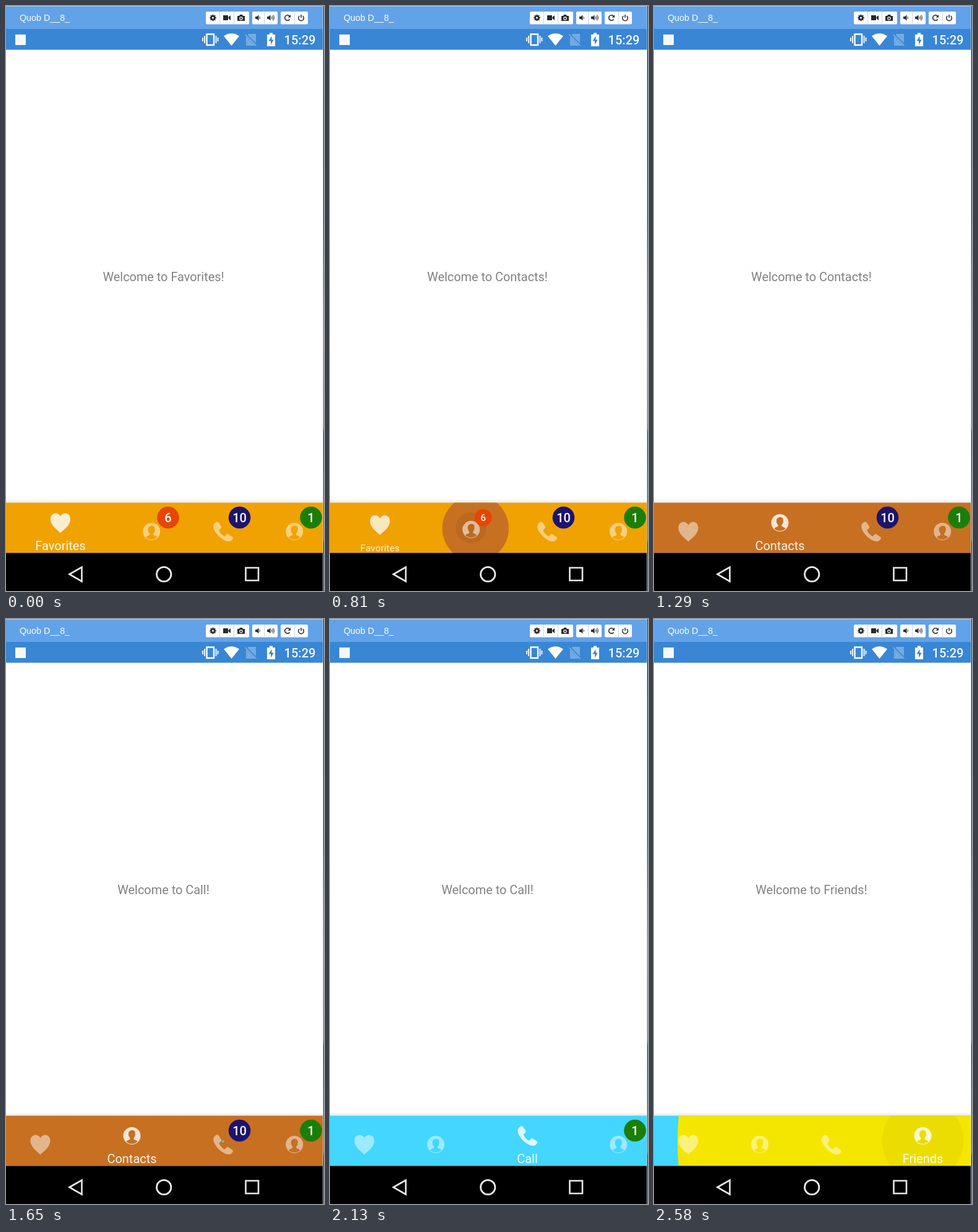
Animation, 514 px wide and 944 px high, one loop 2.61 s. Source, as an HTML page with a canvas:

```html
<!DOCTYPE html>
<html lang="en">
<head>
<meta charset="utf-8">
<title>Bottom navigation</title>
<style>
  html, body { margin: 0; width: 100%; height: 100%; overflow: hidden; background: #fff; }
  canvas { display: block; }
</style>
</head>
<body>
<canvas id="stage" width="514" height="944"></canvas>
<script>
const ctx = document.getElementById('stage').getContext('2d');
const TAU = Math.PI * 2;
const LOOP = 2610, STEP = 30;
const WIDTH = 512, BAR_TOP = 801.6, BAR_BOTTOM = 882.5;
const REVEAL_MS = 300, ITEM_MS = 150, ITEM_DELAY = 16;
const SPACING = 115.5;
const STATUS_BLUE = '#3986d4';

const heart = new Path2D(
  'M0 16.5C-3 12.5-16 5-16-6C-16-12-12-15.5-8-15.5C-4.500-15.500-1.500-13.500 0-10.500' +
  'C1.500-13.500 4.500-15.500 8-15.500C12-15.500 16-12 16-6C16 5 3 12.500 0 16.500Z');
const phone = new Path2D(
  'M-15.500-8.500C-15.500-11.500-13-14-11.500-15C-9.500-16.500-8-15.500-7-14.500L-3-8.500' +
  'C-2-6.500-3-5-4.500-4C-6-3-6.500-2-6-1C-4 3-1 6 2 7.500C3.500 8 4 7 5 5.500' +
  'C6 4 7.500 3.500 9 4.500L15 8.500C16.500 9.500 16.500 11 15.500 12.500' +
  'C14 14.500 12 16 9.500 16C0 16-15.500 2-15.500-8.500Z');
// A solid disc with the head and shoulders cut out of it.
const person = new Path2D();
person.arc(0, 0, 14, 0, TAU);
person.closePath();
person.addPath(new Path2D(
  'M-5.500-4C-5.500-8 0-10.500 3-8.500C5.500-8 5.500-5 5.300-3.500C6 0 4 2 3 3.500L3 5.500' +
  'C5 7 8 7 9 9.500Q5 13 0 13Q-5 13-9 9.500C-8 7-5 7-3 5.500L-3 3.500C-4 2-6 0-5.500-4Z'));

const tabs = [
  { label: 'Favorites', color: '#f0a202', icon: heart },
  { label: 'Contacts', color: '#c77022', icon: person, badge: '6', badgeColor: '#e64600' },
  { label: 'Call', color: '#43d6ff', icon: phone, badge: '10', badgeColor: '#1d146e' },
  { label: 'Friends', color: '#f5e602', icon: person, badge: '1', badgeColor: '#1b7e08' }
];
const selectedAt = [-1000, 747, 1639, 2359.5];

const clamp = v => Math.max(0, Math.min(1, v));
const mix = (a, b, p) => a + (b - a) * p;
const ease = p => 0.5 - 0.5 * Math.cos(Math.PI * clamp(p));

function rect(x, y, w, h, color) {
  ctx.fillStyle = color;
  ctx.fillRect(x, y, w, h);
}

function disc(x, y, r, color) {
  ctx.beginPath();
  ctx.arc(x, y, r, 0, TAU);
  ctx.fillStyle = color;
  ctx.fill();
}

function shape(d, color, x = 0, y = 0, stroke = 0) {
  const path = typeof d === 'string' ? new Path2D(d) : d;
  ctx.save();
  ctx.translate(x, y);
  if (stroke) {
    ctx.strokeStyle = color;
    ctx.lineWidth = stroke;
    ctx.stroke(path);
  } else {
    ctx.fillStyle = color;
    ctx.fill(path, 'evenodd');
  }
  ctx.restore();
}

function text(str, x, y, font, color, align = 'center') {
  ctx.font = font;
  ctx.textAlign = align;
  ctx.fillStyle = color;
  ctx.fillText(str, x, y);
}

function buttonGroup(x, width, dividers) {
  ctx.beginPath();
  ctx.roundRect(x, 9, width, 20.5, 2);
  ctx.fillStyle = '#fff';
  ctx.fill();
  dividers.forEach(d => rect(d, 9, 1, 20.5, '#c9d6e4'));
}

function speaker(x, waves) {
  const ink = '#303030';
  shape('M-5-2h2.500l3-2.500v9l-3-2.500h-2.500z', ink, x, 19);
  for (let i = 0; i < waves; i++) {
    ctx.beginPath();
    ctx.arc(x, 19, 2.5 + i * 2, -0.8, 0.8);
    ctx.strokeStyle = ink;
    ctx.lineWidth = 1;
    ctx.stroke();
  }
}

function drawTitleBar() {
  const ink = '#282828';
  rect(0, 0, WIDTH, 37, '#62a2e8');
  rect(0, 0, WIDTH, 1, '#a9cbf0');
  text('Quob D__8_', 22, 24, '14.3px "Liberation Sans", Arial, sans-serif', '#fff', 'left');
  buttonGroup(323, 70, [345, 368]);
  buttonGroup(398, 41, [417]);
  buttonGroup(444, 44, [466]);

  for (let i = 0; i < 8; i++) {
    ctx.save();
    ctx.translate(334.5, 19);
    ctx.rotate(i * TAU / 8);
    rect(-1.1, -5.2, 2.2, 3, ink);
    ctx.restore();
  }
  disc(334.5, 19, 3.8, ink);
  disc(334.5, 19, 1.6, '#fff');

  shape('M-6-4h8v8h-8zM2.500-1l3.500-3v8l-3.500-3z', ink, 357, 19);
  shape('M-6-3h3l1-2h4l1 2h3v8h-12z', ink, 380, 19);
  disc(380, 20, 2.8, '#fff');
  disc(380, 20, 1.6, ink);
  speaker(408, 1);
  speaker(427, 3);
  shape('M3.500 2.500A4.300 4.300 0 1 1 3-3', ink, 455, 19, 1.6);
  shape('M5-5v4.500h-4.500z', ink, 455, 19);
  shape('M-2.500-3.500A4.300 4.300 0 1 0 2.500-3.500M0-5.500V-.5', ink, 477, 19.5, 1.5);
}

function drawStatusBar() {
  rect(0, 37, WIDTH, 33.6, STATUS_BLUE);
  rect(15, 46, 17, 17, '#f4f8fc');
  shape('M324.500 45.500h11.500v17.500h-11.500z', '#fff', 0, 0, 2.4);
  shape('M321 48v12M339.500 48v12M318 51v6M342.500 51v6', '#fff', 0, 0, 1.8);
  shape('M364.500 64L352 48.500Q364.500 40 377 48.500Z', '#fff');
  shape('M392 45h12v15L390.500 46.500zM388 49l15 15h-15z', 'rgba(255,255,255,.3)');
  shape('M386.500 46l18 18', 'rgba(255,255,255,.35)', 0, 0, 1.6);
  shape('M422 46h4v-2.500h5v2.500h4v19h-13z', '#fff');
  shape('M429.500 48.500l-5 8h3.500v6l4.800-8h-3.300z', STATUS_BLUE);
  text('15:29', 475, 62, '500 20px Roboto, sans-serif', '#f5f9ff');
}

function drawSystemBar() {
  const ink = '#e8e8e8';
  rect(0, BAR_BOTTOM, WIDTH, 944 - BAR_BOTTOM, '#000');
  shape('M102.500 917L122.500 905.500V928.500Z', ink, 0, 0, 2.6);
  shape('M243.500 917a11.700 11.700 0 1 0 23.400 0a11.700 11.700 0 1 0-23.400 0', ink, 0, 0, 2.8);
  shape('M387.500 906.500h20.500v20.500h-20.500z', ink, 0, 0, 2.6);
}

function drawEdge() {
  const edge = ctx.createLinearGradient(0, 0, 0, 944);
  [[0, '#16324f'], [0.36, '#1d4a70'], [0.56, '#35b4e0'], [0.72, '#2f9fd0'],
   [0.73, '#1c4668'], [0.91, '#2b88b5'], [0.92, '#142a3f'], [1, '#142a3f']]
    .forEach(([at, color]) => edge.addColorStop(at, color));
  rect(WIDTH, 0, 1, 944, '#a5c3d8');
  rect(WIDTH + 1, 0, 1, 944, edge);
}

// Tabs beyond the wide one sit one inactive width further right.
const tabX = (i, active) => (i < active ? 55.5 : i === active ? 88 : 120) + SPACING * i - (i > active ? 0.3 : 0);

function drawTab(tab, i, active, previous, p) {
  const x = mix(tabX(i, previous), tabX(i, active), p);
  const focus = mix(+(i === previous), +(i === active), p);

  ctx.globalAlpha = mix(0.48, 0.82, focus);
  shape(tab.icon, '#fff', x, mix(848, 834, focus));
  ctx.globalAlpha = 1;

  if (focus > 0.02) {
    ctx.save();
    ctx.translate(x, mix(889, 871, focus));
    ctx.scale(focus, focus);
    ctx.globalAlpha = mix(0.45, 0.92, focus);
    text(tab.label, 0, 7, '20px Roboto, sans-serif', '#fff');
    ctx.restore();
  }

  const size = i > active ? 1 : i === active ? 1 - p : 0;
  if (tab.badge && size > 0.01) {
    ctx.save();
    ctx.translate(146.5 + SPACING * i - 64 * (1 - size), 825.5);
    ctx.scale(size, size);
    disc(0, 0, 17.8, tab.badgeColor);
    text(tab.badge, 0, 7.2, '500 20px Roboto, sans-serif', '#fff');
    ctx.restore();
  }
}

function drawBar(active, elapsed) {
  const previous = Math.max(0, active - 1);
  const p = ease((elapsed - ITEM_DELAY) / ITEM_MS);
  const reveal = ease(elapsed / REVEAL_MS);

  const shadow = ctx.createLinearGradient(0, BAR_TOP - 6, 0, BAR_TOP);
  shadow.addColorStop(0, 'rgba(0,0,0,0)');
  shadow.addColorStop(1, 'rgba(0,0,0,.09)');
  rect(0, BAR_TOP - 6, WIDTH, 6, shadow);

  ctx.save();
  ctx.beginPath();
  ctx.rect(0, BAR_TOP, WIDTH, BAR_BOTTOM - BAR_TOP);
  ctx.clip();
  rect(0, BAR_TOP - 1, WIDTH, 84, tabs[reveal < 1 ? previous : active].color);
  if (reveal < 1) disc(120 + SPACING * active - 0.3, 843, WIDTH * reveal, tabs[active].color);

  const fade = 1 - clamp((elapsed - 120) / 300);
  if (fade > 0) {
    const x = mix(tabX(active, previous), tabX(active, active), p);
    disc(x, 842, 66 * ease(elapsed / ITEM_MS), `rgba(0,0,0,${0.06 * fade})`);
  }
  tabs.forEach((tab, i) => drawTab(tab, i, active, previous, p));
  ctx.restore();
}

function draw(time) {
  const active = selectedAt.filter(start => time >= start).length - 1;
  rect(0, 0, 514, 944, '#fff');
  drawTitleBar();
  drawStatusBar();
  text(`Welcome to ${tabs[active].label}!`, 254.5, 444, '19.9px Roboto, sans-serif', '#818181');
  drawBar(active, time - selectedAt[active]);
  drawSystemBar();
  drawEdge();
}

const origin = performance.now();
function tick() {
  const time = (performance.now() - origin) % LOOP;
  draw(Math.floor(time / STEP) * STEP);
  requestAnimationFrame(tick);
}
tick();
</script>
</body>
</html>
```
